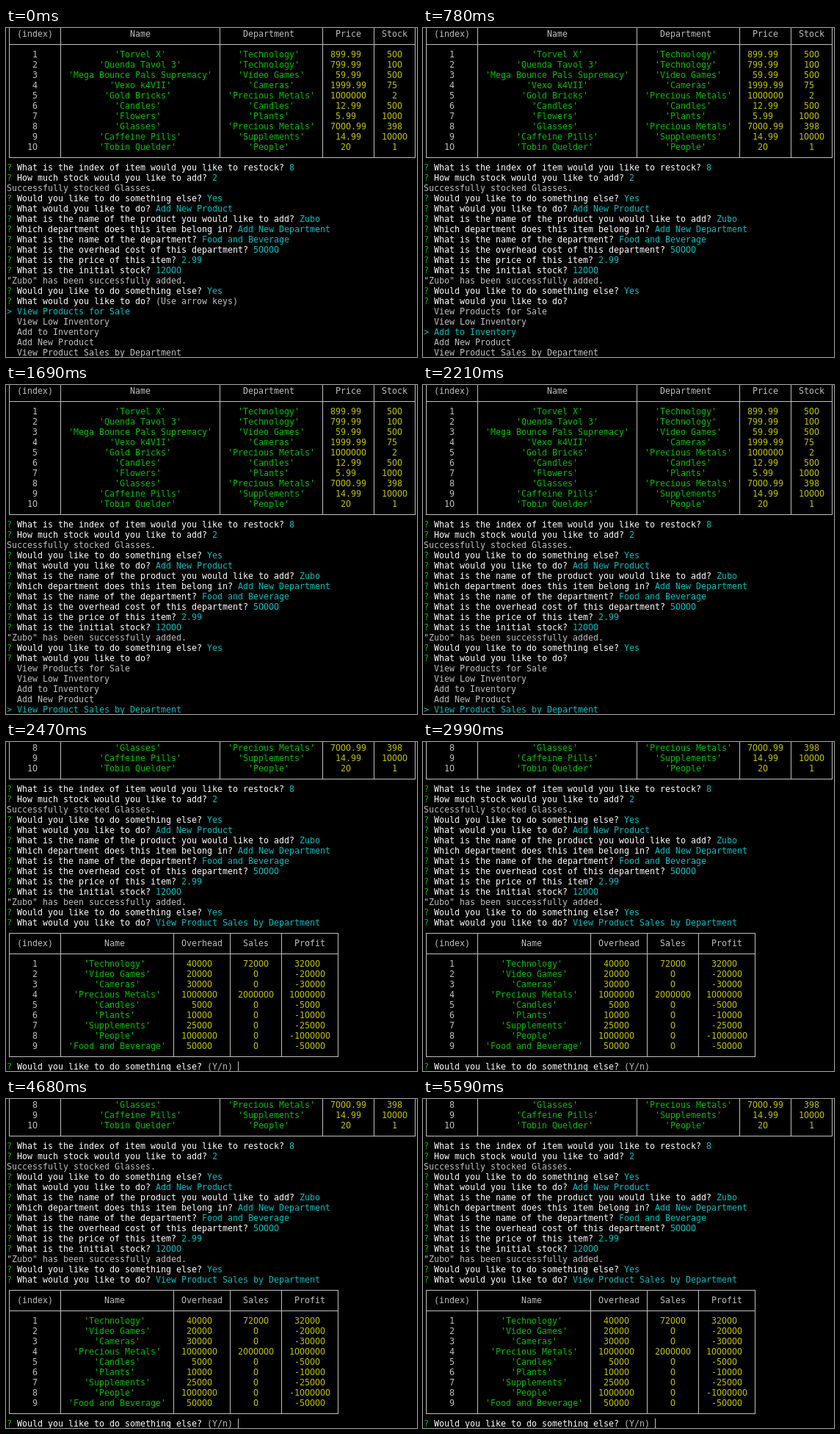
An HTML page with a canvas for the animation above (5720 ms loop, 560x448 px).

```html
<!DOCTYPE html>
<html lang="en">
<head>
<meta charset="utf-8">
<title>Inventory terminal</title>
<style>
  html, body { margin: 0; width: 100%; height: 100%; overflow: hidden; background: #000; }
  canvas { display: block; }
</style>
</head>
<body>
<canvas id="stage" width="560" height="448"></canvas>
<script>
const ctx = document.getElementById('stage').getContext('2d');

const LOOP = 5720;
const CELL_W = 7, ROW_H = 14;
const KEY_TIMES = [390, 780, 1235, 1690];
const ENTER_TIME = 2470;
const BLINK = 520;
const SCROLL_ROWS = 9;

const WHITE = '#fff', GRAY = '#bfbfbf', GREEN = '#00bf00', YELLOW = '#bfbf00', CYAN = '#00bfbf';

const products = {
  heads: ['(index)', 'Name', 'Department', 'Price', 'Stock'],
  edges: [0, 10, 41, 61, 71, 79],
  colors: [GRAY, GREEN, GREEN, YELLOW, YELLOW],
  rows: [
    ['Torvel X', 'Technology', '899.99', '500'],
    ['Quenda Tavol 3', 'Technology', '799.99', '100'],
    ['Mega Bounce Pals Supremacy', 'Video Games', '59.99', '500'],
    ['Vexo k4VII', 'Cameras', '1999.99', '75'],
    ['Gold Bricks', 'Precious Metals', '1000000', '2'],
    ['Candles', 'Candles', '12.99', '500'],
    ['Flowers', 'Plants', '5.99', '1000'],
    ['Glasses', 'Precious Metals', '7000.99', '398'],
    ['Caffeine Pills', 'Supplements', '14.99', '10000'],
    ['Tobin Quelder', 'People', '20', '1']
  ]
};

const sales = {
  heads: ['(index)', 'Name', 'Overhead', 'Sales', 'Profit'],
  edges: [0, 10, 32, 43, 53, 64],
  colors: [GRAY, GREEN, YELLOW, YELLOW, YELLOW],
  rows: [
    ['Technology', 40000, 72000],
    ['Video Games', 20000, 0],
    ['Cameras', 30000, 0],
    ['Precious Metals', 1000000, 2000000],
    ['Candles', 5000, 0],
    ['Plants', 10000, 0],
    ['Supplements', 25000, 0],
    ['People', 1000000, 0],
    ['Food and Beverage', 50000, 0]
  ].map(([name, overhead, sold]) => [name, overhead, sold, sold - overhead])
};

// Lines without an answer are plain output.
const dialog = [
  ['What is the index of item would you like to restock?', '8'],
  ['How much stock would you like to add?', '2'],
  ['Successfully stocked Glasses.'],
  ['Would you like to do something else?', 'Yes'],
  ['What would you like to do?', 'Add New Product'],
  ['What is the name of the product you would like to add?', 'Zubo'],
  ['Which department does this item belong in?', 'Add New Department'],
  ['What is the name of the department?', 'Food and Beverage'],
  ['What is the overhead cost of this department?', '50000'],
  ['What is the price of this item?', '2.99'],
  ['What is the initial stock?', '12000'],
  ['"Zubo" has been successfully added.'],
  ['Would you like to do something else?', 'Yes']
];

const menu = ['View Products for Sale', 'View Low Inventory', 'Add to Inventory',
  'Add New Product', 'View Product Sales by Department'];

const lineX = col => 4 + col * CELL_W;
const lineY = row => 8 + row * ROW_H;

function print(text, col, row, color) {
  ctx.fillStyle = color;
  // Zeros are drawn open, without a dot or slash.
  [...text.replace(/0/g, 'O')].forEach((ch, i) => {
    if (ch !== ' ') ctx.fillText(ch, 1 + (col + i) * CELL_W, 12 + row * ROW_H);
  });
}

function ask(question, answer, row, color = CYAN) {
  print('?', 0, row, GREEN);
  print(question, 2, row, WHITE);
  print(answer, question.length + 3, row, color);
}

function drawTable({ heads, edges, colors, rows }, top) {
  const bottom = top + rows.length + 3;
  const right = lineX(edges[edges.length - 1]);
  const printRow = (cells, row, colorOf) => cells.forEach((cell, i) => {
    const room = edges[i + 1] - edges[i] - 1;
    print(cell, edges[i] + 1 + Math.floor((room - cell.length) / 2), row, colorOf(i));
  });

  ctx.fillStyle = GRAY;
  for (const row of [top, top + 2, bottom]) {
    ctx.fillRect(lineX(0), lineY(row), right - lineX(0) + 1, 1);
  }
  for (const edge of edges) {
    ctx.fillRect(lineX(edge), lineY(top), 1, lineY(bottom) - lineY(top) + 1);
  }

  printRow(heads, top + 1, () => GRAY);
  rows.forEach((values, n) => {
    const cells = [n + 1, ...values].map((v, i) =>
      i > 0 && colors[i] === GREEN ? `'${v}'` : String(v));
    printRow(cells, top + 3 + n, i => colors[i]);
  });
}

function drawMenu(t, row) {
  const selected = KEY_TIMES.filter(time => t >= time).length;
  ask('What would you like to do?', selected ? '' : '(Use arrow keys)', row, GRAY);
  menu.forEach((item, i) => {
    const active = i === selected;
    if (active) print('>', 0, row + 1 + i, CYAN);
    print(item, 2, row + 1 + i, active ? CYAN : GRAY);
  });
}

function drawReport(t, row) {
  ask('What would you like to do?', menu[4], row);
  drawTable(sales, row + 1);
  ask('Would you like to do something else?', '(Y/n)', row + 14, GRAY);
  if (Math.floor((t - ENTER_TIME) / BLINK) % 2 === 0) {
    ctx.fillStyle = GRAY;
    ctx.fillRect(316, 435, 1, 13);
  }
}

function draw(t) {
  const entered = t >= ENTER_TIME;
  const scroll = entered ? SCROLL_ROWS : 0;
  ctx.fillStyle = '#000';
  ctx.fillRect(0, 0, 560, 448);
  ctx.font = '11.63px "DejaVu Sans Mono", monospace';
  ctx.textBaseline = 'alphabetic';

  drawTable(products, -1 - scroll);
  dialog.forEach(([text, answer], i) => {
    const row = 13 + i - scroll;
    if (answer) ask(text, answer, row);
    else print(text, 0, row, GRAY);
  });
  (entered ? drawReport : drawMenu)(t, 26 - scroll);
}

const start = performance.now();
function tick() {
  draw((performance.now() - start) % LOOP);
  requestAnimationFrame(tick);
}
tick();
</script>
</body>
</html>
```
